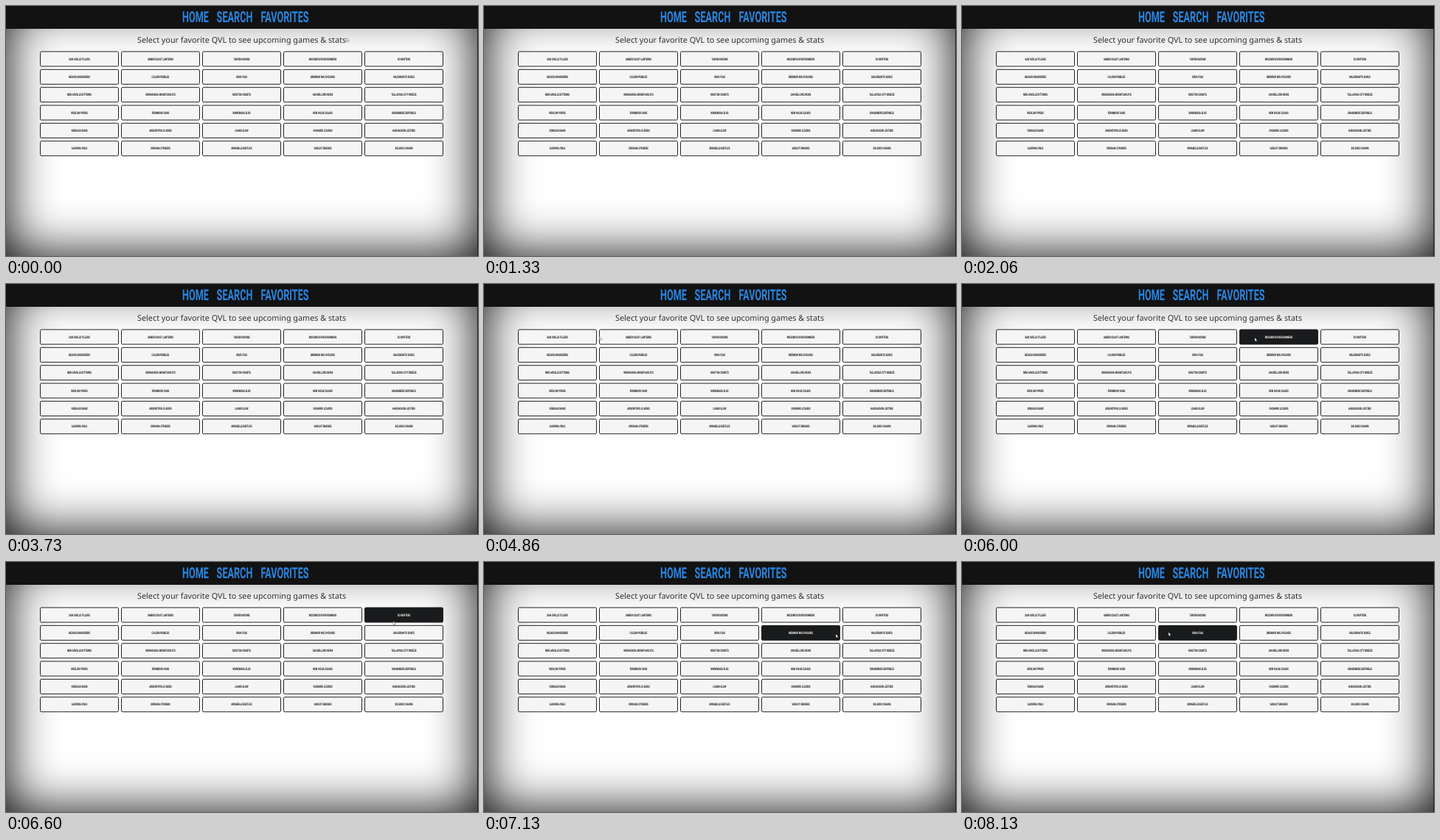
Write an HTML page that moves like this. It is 640 px wide and 340 px high and loops after 8200 ms.

```html
<!DOCTYPE html>
<html lang="en">
<head>
<meta charset="utf-8">
<title>Team picker</title>
<style>
  html, body { margin: 0; width: 100%; height: 100%; overflow: hidden; background: #fff; }
  .page { position: absolute; left: 0; top: 0; width: 640px; height: 340px; overflow: hidden; box-shadow: inset 0 0 68px #000; }
  svg { display: block; }
  text { text-anchor: middle; text-rendering: geometricPrecision; }
  .caps { font-family: Roboto, "Liberation Sans", sans-serif; font-weight: 700; }
  .nav { font-size: 20.6px; fill: #2886e2; }
  .title { font: 500 10.8px "Noto Sans", "Open Sans", sans-serif; fill: #303134; }
  .team rect { fill: #f5f5f5; stroke: #202124; stroke-width: 1; }
  .team text { font-size: 4.7px; fill: #1c1c1c; }
  .team.on rect { fill: #1a1b1c; }
  .team.on text { fill: #fff; }
</style>
</head>
<body>
<div class="page">
  <svg id="stage" width="640" height="340" viewBox="0 0 640 340"></svg>
</div>
<script>
const LOOP = 8200, STEP = 1000 / 15;
const COLS = 5, LEFT = 46.5, TOP = 62, PITCH_X = 110, PITCH_Y = 24.35, W = 106, H = 20;
const NARROW = 0.615;

const teams = [
  "San Ovello Tillers", "Amber Coast Lanterns", "Tarven Moons", "Mosswick River Runners", "So Drifters",
  "Helmso Wanderers", "Calden Pebbles", "Orva Folk", "Brennor Wolfhounds", "Malveranto Dukes",
  "New Arvelle Bitterns", "Wennasoka Mountaincats", "Farston Comets", "San Belloro Reins", "Tallavosa City Breeze",
  "Wexlow Pipers", "Fernmoor Oars", "Kinnewaka Elks", "New Holm Cloaks", "Grandmere Sentinels",
  "Vensago Rams", "Argentopolis 42ers", "Luano Glow", "Ondarro Lizards", "Harlingson Jesters",
  "Aldorra Owls", "Orriana Striders", "Mirabelle Beetles", "Varloit Engines", "Solendo Charm"
];

// Pointer keys: time, x, y
const path = [
  [3800, 214, 34], [4260, 141, 42], [4400, 134, 64], [4600, 122, 71], [4860, 155, 71],
  [5200, 226, 72], [6000, 397, 73], [6300, 468, 74], [6550, 524, 77], [6800, 530, 95],
  [7000, 507, 98], [7130, 478, 98], [7500, 385, 97], [7800, 305, 96], [8130, 280, 95.5]
];

const stage = document.getElementById("stage");

function add(parent, tag, attrs, label) {
  const el = document.createElementNS("http://www.w3.org/2000/svg", tag);
  for (const key in attrs) el.setAttribute(key, attrs[key]);
  if (label) el.textContent = label;
  return parent.appendChild(el);
}

function caps(parent, label, x, y, cls) {
  add(parent, "text", {
    class: "caps " + cls,
    transform: `translate(${x} ${y}) scale(${NARROW} 1)`
  }, label.toUpperCase());
}

add(stage, "rect", { width: 640, height: 31, fill: "#121212" });
add(stage, "rect", { x: 639, y: 31, width: 1, height: 309, fill: "#222" });
caps(stage, "Home", 257, 22.4, "nav");
caps(stage, "Search", 310, 22.4, "nav");
caps(stage, "Favorites", 378, 22.4, "nav");
add(stage, "text", { class: "title", x: 319.6, y: 49.8 },
  "Select your favorite QVL to see upcoming games & stats");

const buttons = teams.map((name, i) => {
  const x = LEFT + (i % COLS) * PITCH_X;
  const y = TOP + Math.floor(i / COLS) * PITCH_Y;
  const el = add(stage, "g", { class: "team" });
  add(el, "rect", { x, y, width: W, height: H, rx: 1.6 });
  caps(el, name, x + W / 2, y + H / 2 + 1.6, "");
  return { el, x, y };
});

const pointer = add(stage, "path", {
  d: "M0 0V4.8L1.1 3.9L1.9 5.5L2.6 5.1L1.9 3.6L3.3 3.4Z",
  fill: "#fff", stroke: "#333", "stroke-width": 0.4
});

function pointerAt(t) {
  if (t < 1060) return [462, 43.5];
  if (t < path[0][0]) return null;
  const n = path.findIndex(key => key[0] > t);
  if (n < 0) return path[path.length - 1].slice(1);
  const a = path[n - 1], b = path[n];
  const k = (t - a[0]) / (b[0] - a[0]);
  return [a[1] + (b[1] - a[1]) * k, a[2] + (b[2] - a[2]) * k];
}

function draw(time) {
  const t = Math.floor((time % LOOP + 7) / STEP) * STEP;
  const pos = pointerAt(t);
  pointer.style.display = pos ? "" : "none";
  if (pos) pointer.setAttribute("transform", `translate(${pos[0]} ${pos[1]})`);
  for (const { el, x, y } of buttons) {
    const over = pos && pos[0] >= x && pos[0] <= x + W && pos[1] >= y && pos[1] <= y + H;
    el.classList.toggle("on", Boolean(over));
  }
}

const start = performance.now();
function tick() {
  draw(performance.now() - start);
  requestAnimationFrame(tick);
}
tick();
</script>
</body>
</html>
```
